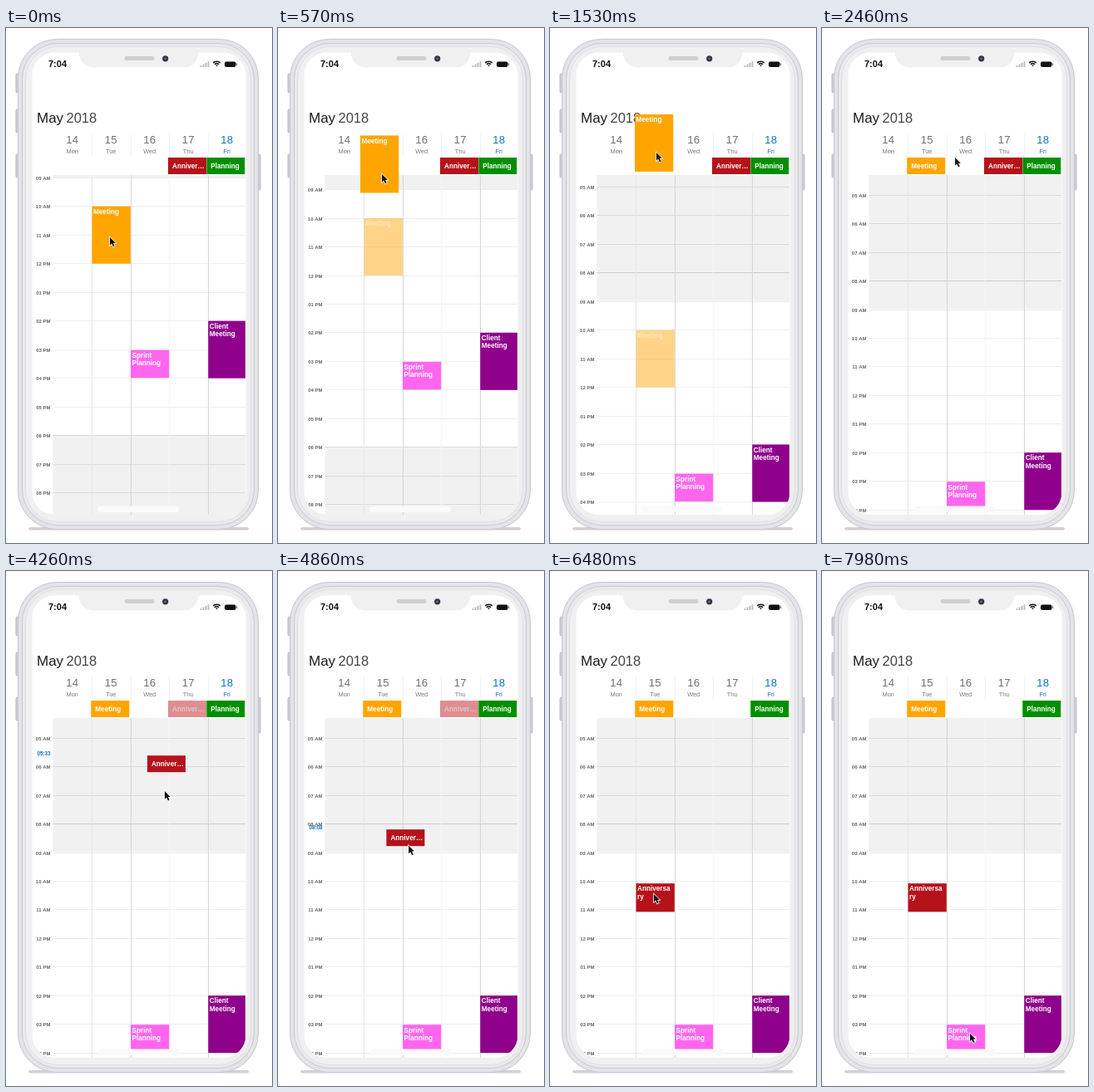
An HTML page with a canvas that plays this animation: 320 px wide and 620 px high, repeating every 8000 ms.

```html
<!DOCTYPE html>
<html lang="en">
<head>
<meta charset="utf-8">
<title>Calendar drag and drop</title>
<style>
  html, body { margin: 0; width: 100%; height: 100%; overflow: hidden; background: #fff; }
  canvas { display: block; width: 320px; height: 620px; }
</style>
</head>
<body>
<canvas id="stage"></canvas>
<script>
const LOOP = 8000;
const canvas = document.getElementById('stage');
const ratio = window.devicePixelRatio || 1;
canvas.width = 320 * ratio;
canvas.height = 620 * ratio;
const ctx = canvas.getContext('2d');
ctx.scale(ratio, ratio);

const FONT = '"Liberation Sans", Arial, sans-serif';
const ORANGE = '#ffa500', RED = '#b5121b', GREEN = '#008f00', PINK = '#ff66ee', PURPLE = '#8f008b';
const BLUE = '#1274bd', BEZEL = '#f0f0f1';
const HOUR = 34.45, GRID_TOP = 177, GRID_LEFT = 56.5, COLUMN = 46.5, GRID_RIGHT = 288;
const columnX = day => GRID_LEFT + day * COLUMN;

// Key poses: [time, x, y]
const cursorPath = [
  [0, 125, 252], [100, 125, 252], [440, 125, 180], [570, 125, 176], [1110, 128, 146],
  [1500, 128, 148], [1750, 128, 164], [2050, 130, 165], [2460, 160, 156], [3200, 224, 167],
  [3980, 224, 168], [4260, 191, 265], [4800, 160, 325], [5460, 129, 385], [5700, 125, 389],
  [7300, 125, 389], [7850, 178, 555], [8000, 178, 557]
];
const meetingPath = [
  [90, 103.5, 214.5], [170, 99, 195], [440, 99, 133], [570, 99, 129.5], [1110, 102, 100],
  [1500, 102, 102], [1750, 102, 118], [1950, 102, 118]
];
const anniversaryPath = [
  [4030, 195, 156], [4260, 170, 222], [4800, 134, 305], [5460, 95, 371.5], [5750, 94, 375]
];
const scrollPath = [[0, 0, 0], [470, 0, 0], [1600, 0, 158.5], [LOOP, 0, 158.5]];

function at(path, t) {
  const i = path.findIndex(key => key[0] >= t);
  if (i < 0) return path[path.length - 1].slice(1);
  if (i === 0) return path[0].slice(1);
  const [t0, x0, y0] = path[i - 1], [t1, x1, y1] = path[i];
  const k = (t - t0) / (t1 - t0);
  return [x0 + (x1 - x0) * k, y0 + (y1 - y0) * k];
}
const during = (path, t) => t >= path[0][0] && t < path[path.length - 1][0];

function rect(x, y, w, h, color) {
  ctx.fillStyle = color;
  ctx.fillRect(x, y, w, h);
}
function round(x, y, w, h, r, fill, stroke) {
  ctx.beginPath();
  ctx.roundRect(x, y, w, h, r);
  if (fill) { ctx.fillStyle = fill; ctx.fill(); }
  if (stroke) { ctx.strokeStyle = stroke; ctx.lineWidth = 1; ctx.stroke(); }
}
function text(str, x, y, size, color, weight = 'normal', align = 'left') {
  ctx.font = `${weight} ${size}px ${FONT}`;
  ctx.textAlign = align;
  ctx.fillStyle = color;
  ctx.fillText(str, x, y);
}

function block(lines, x, y, h, color, w = 46.3) {
  rect(x, y, w, h, color);
  lines.forEach((line, i) => text(line, x + 1.5, y + 9.3 + i * 9.2, 8.2, '#fff', 'bold'));
}
function banner(label, x, y, color) {
  rect(x, y, 46, 20, color);
  text(label, x + 5, y + 13, 8.2, '#fff', 'bold');
}
function faded(draw) {
  ctx.globalAlpha = 0.47;
  draw();
  ctx.globalAlpha = 1;
}

function phone() {
  const metal = '#cfcfd6';
  for (const [y, h] of [[55, 23], [98, 28], [152, 28]]) round(12, y, 4, h, 1.5, metal, '#b9b9c2');
  round(302, 152, 4, 43, 1.5, metal, '#b9b9c2');
  round(27, 601, 265, 3.5, 2, '#d2d2d6');
  round(14.5, 13.5, 289, 590, 47, '#e3e3e8', '#c6c6cf');
  round(19.5, 18.5, 279, 580, 43, '#eaeaee', '#c9c9d1');
  round(23.5, 22.5, 271, 572, 39, BEZEL, '#e0e0e4');
}

function grid(t, scroll) {
  const hourY = hour => 180 + (hour - 9) * HOUR + scroll;
  ctx.save();
  ctx.beginPath();
  ctx.rect(31, GRID_TOP, 258, 410);
  ctx.clip();
  const width = GRID_RIGHT - GRID_LEFT;
  rect(GRID_LEFT, GRID_TOP, width, hourY(9) - GRID_TOP, '#f1f1f1');
  rect(GRID_LEFT, hourY(18), width, 200, '#f1f1f1');
  for (let h = 4; h < 22; h++) {
    const y = Math.round(hourY(h));
    const working = h > 8 && h < 18;
    rect(GRID_LEFT, y, width, 1, h === 8 ? '#cacad6' : working ? '#eeeeee' : '#dadade');
    const label = String(h % 12 || 12).padStart(2, '0') + (h < 12 ? ' AM' : ' PM');
    text(label, 53.5, y + 2.5, 6, '#666', 'bold', 'right');
  }
  for (let day = 1; day < 5; day++) {
    rect(Math.round(columnX(day)), GRID_TOP, 1, 410, day % 2 && day < 3 ? '#e6e6e6' : day === 3 ? '#f5f5f5' : '#d6d6d6');
  }

  const meeting = () => block(['Meeting'], 103.5, hourY(10) + 0.3, 69, ORANGE);
  if (t < meetingPath[0][0]) meeting();
  else if (during(meetingPath, t)) faded(meeting);
  block(['Sprint', 'Planning'], 150, hourY(15) + 1, 33.5, PINK);
  block(['Client', 'Meeting'], 243.3, hourY(14) + 0.4, 69, PURPLE, 44.7);
  if (t >= 5750) block(['Anniversa', 'ry'], 103.5, hourY(10) + 3.2, 34.2, RED);
  ctx.restore();
}

function header(t) {
  text('May', 37, 114, 17, '#1c1c1c');
  text('2018', 72.5, 114, 16.5, '#444');
  ['Mon', 'Tue', 'Wed', 'Thu', 'Fri'].forEach((name, day) => {
    const x = columnX(day) + 23.2, today = day === 4;
    if (day) rect(Math.round(columnX(day)), 127, 1, 28, '#f3f3f3');
    text(14 + day, x, 138.5, 13.2, today ? BLUE : '#707070', 'normal', 'center');
    text(name, x, 150.5, 7.4, today ? BLUE : '#777', 'normal', 'center');
  });
  if (t >= 1950) banner('Meeting', 102.3, 156, ORANGE);
  const anniversary = () => banner('Anniver…', 195, 156, RED);
  if (t < anniversaryPath[0][0]) anniversary();
  else if (during(anniversaryPath, t)) faded(anniversary);
  banner('Planning', 241.3, 156, GREEN);
}

function statusBar() {
  round(88, 23.5, 143, 24, [0, 0, 17, 17], BEZEL);
  round(142.5, 34, 36, 5, 2.5, '#cfcfd0');
  ctx.fillStyle = '#34343f';
  ctx.beginPath();
  ctx.arc(191.7, 36.8, 3.6, 0, 7);
  ctx.fill();
  ctx.fillStyle = '#5a63a0';
  ctx.beginPath();
  ctx.arc(191.7, 36.8, 1.4, 0, 7);
  ctx.fill();
  text('7:04', 51, 47, 11, '#111', 'bold');
  for (let i = 0; i < 4; i++) rect(233.5 + i * 3, 45 - i * 1.5, 2, 2 + i * 1.5, '#bdbdbd');
  ctx.strokeStyle = '#111';
  ctx.lineWidth = 1.6;
  for (const r of [1, 3.6, 6.2]) {
    ctx.beginPath();
    ctx.arc(253.5, 46.4, r, -Math.PI * 0.75, -Math.PI * 0.25);
    ctx.stroke();
  }
  round(263, 40.5, 13.5, 6.5, 2, '#111');
  rect(277.2, 42.5, 1, 2.5, '#555');
}

function timeLabel(y, scroll) {
  if (y < GRID_TOP) return;
  const minutes = Math.round((9 + (y - 2.6 - 180 - scroll) / HOUR) * 60);
  const pad = n => String(n).padStart(2, '0');
  text(pad(Math.floor(minutes / 60)) + ':' + pad(minutes % 60), 53.5, y - 0.5, 6.3, BLUE, 'bold', 'right');
}

function dragged(t, scroll) {
  if (during(meetingPath, t)) {
    const [x, y] = at(meetingPath, t);
    block(['Meeting'], x, y, 69, ORANGE);
    timeLabel(y, scroll);
  }
  if (during(anniversaryPath, t)) {
    const [x, y] = at(anniversaryPath, t);
    banner('Anniver…', x, y, RED);
    timeLabel(y, scroll);
  }
}

function cursor(x, y) {
  const outline = [[0, 0], [0, 9.6], [2.2, 7.6], [4, 11.4], [5.7, 10.6], [4, 7], [6.8, 6.8]];
  ctx.beginPath();
  outline.forEach(([dx, dy]) => ctx.lineTo(x + dx, y + dy));
  ctx.closePath();
  ctx.strokeStyle = '#fff';
  ctx.lineWidth = 1.5;
  ctx.stroke();
  ctx.fillStyle = '#111';
  ctx.fill();
}

function draw(t) {
  const scroll = at(scrollPath, t)[1];
  rect(0, 0, 320, 620, '#fff');
  phone();
  ctx.save();
  round(31.5, 29.5, 257, 556.5, 27, '#fff');
  ctx.clip();
  grid(t, scroll);
  header(t);
  round(110, 575.5, 98, 7.5, 3.7, '#fafafa');
  ctx.restore();
  statusBar();
  dragged(t, scroll);
  cursor(...at(cursorPath, t));
}

const start = performance.now();
function tick() {
  draw((performance.now() - start) % LOOP);
  requestAnimationFrame(tick);
}
tick();
</script>
</body>
</html>
```
